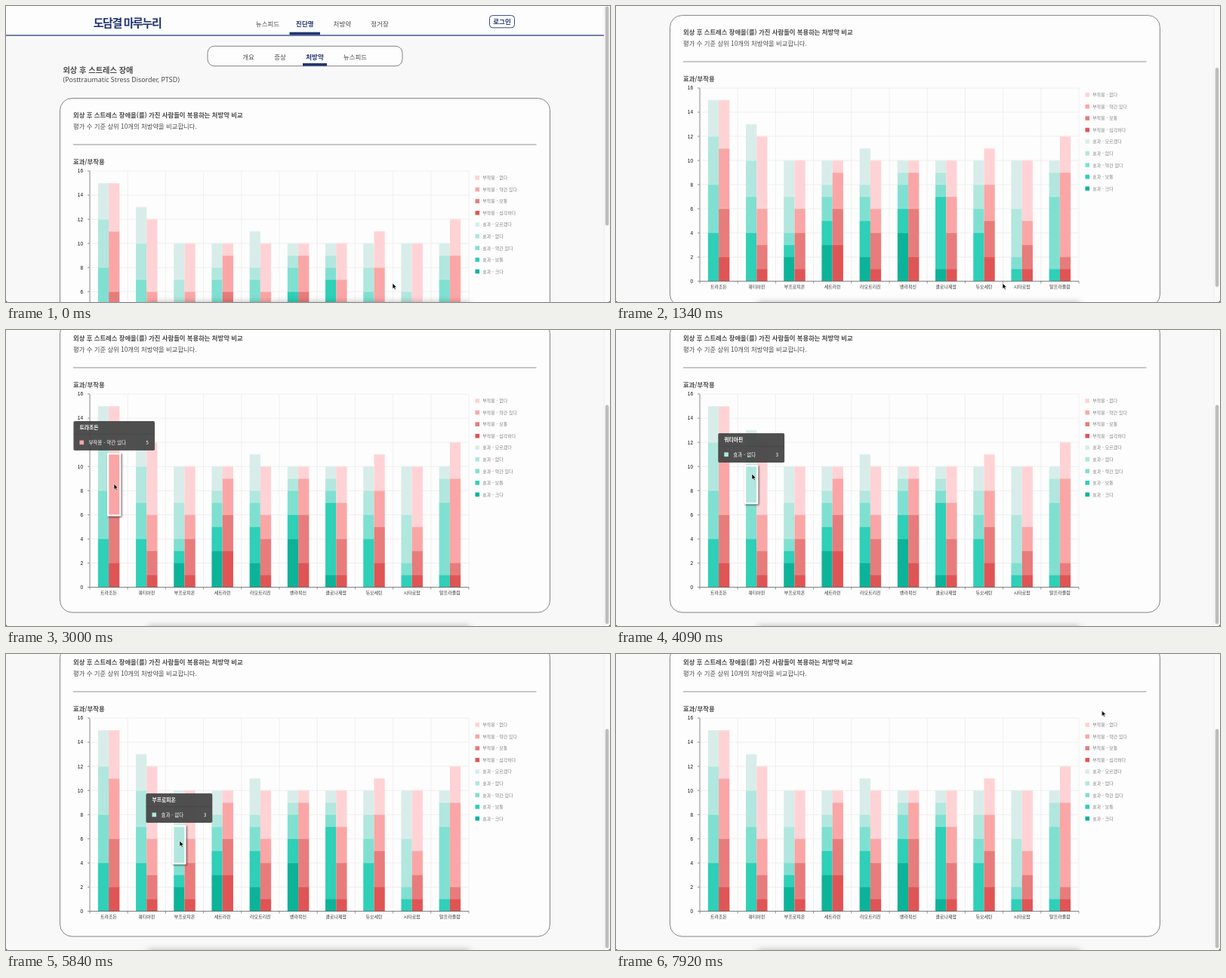
Write an HTML page that moves like this. It is 800 px wide and 393 px high and loops after 8000 ms.

```html
<!DOCTYPE html>
<html lang="ko">
<head>
<meta charset="utf-8">
<title>처방약 비교</title>
<style>
  html, body { margin: 0; width: 100%; height: 100%; overflow: hidden; background: #f8f8f8; }
  svg { display: block; width: 800px; height: 393px; }
  text { font-family: "Noto Sans CJK KR", "Noto Sans KR", "Noto Sans CJK", sans-serif; }
  .latin { font-family: "Noto Sans", sans-serif; }
  .axis { font-family: "Liberation Sans", Arial, sans-serif; }
  .picked { filter: drop-shadow(1px 1px 1px rgba(0, 0, 0, .65)); }
  .shade { filter: drop-shadow(0 0 4px rgba(0, 0, 0, .3)); }
</style>
</head>
<body>
<svg id="stage" viewBox="0 0 800 393"></svg>
<script>
const LOOP = 8000, SCROLL = 134;
const NAVY = '#22356f', INK = '#4c4c4c', EDGE = '#777', GRID = '#ececec';
const LEFT = 111, STEP = 50.2, BAR = 14.25, RIGHT = LEFT + 10 * STEP;
const BASE = 475.5, UNIT = 16.03, TOP = BASE - 16 * UNIT;

const stage = document.getElementById('stage');

function add(parent, tag, attrs = {}) {
  const el = document.createElementNS('http://www.w3.org/2000/svg', tag);
  for (const k in attrs) el.setAttribute(k, attrs[k]);
  parent.append(el);
  return el;
}

const box = (p, x, y, width, height, fill, more) =>
  add(p, 'rect', { x, y, width, height, fill, ...more });

const line = (p, x1, y1, x2, y2, stroke, w = .8) =>
  add(p, 'line', { x1, y1, x2, y2, stroke, 'stroke-width': w });

// y is the middle of the glyphs
function label(p, str, x, y, size, more) {
  const el = add(p, 'text', { x, y: y + size * .37, 'font-size': size, fill: INK, ...more });
  el.textContent = str;
  return el;
}

const MID = { 'text-anchor': 'middle' };
const END = { 'text-anchor': 'end' };
const BOLD = { 'font-weight': 700 };
const ACTIVE = { ...BOLD, fill: NAVY };
const FRAME = { stroke: EDGE, 'stroke-width': .9 };

function play(el, steps) {
  el.animate(steps.map(([t, props]) => ({ offset: t / LOOP, ...props })),
    { duration: LOOP, iterations: Infinity });
}

const at = (x, y) => ({ transform: `translate(${x}px, ${y}px)` });

// Both sides are listed from the bottom of the stack upwards
const sides = [
  { name: '효과', keys: ['크다', '보통', '약간 있다', '없다', '모르겠다'],
    colors: ['#0cb399', '#2fcfb8', '#7fe0d1', '#b1e7de', '#d8ede9'] },
  { name: '부작용', keys: ['심각하다', '보통', '약간 있다', '없다'],
    colors: ['#df5555', '#e87c7c', '#fba6a6', '#ffd3d5'] }
];

// Running totals of each stack
const drugs = [
  ['트라조든', [0, 4, 8, 12, 15], [2, 6, 11, 15]],
  ['쿼티아핀', [0, 4, 7, 10, 13], [1, 3, 6, 12]],
  ['부프로피온', [2, 3, 4, 7, 10], [1, 4, 6, 10]],
  ['세트라린', [3, 5, 7, 8, 10], [3, 6, 9, 10]],
  ['라모트리진', [2, 5, 7, 8, 11], [1, 4, 6, 10]],
  ['벤라팍신', [4, 6, 8, 9, 10], [2, 6, 9, 10]],
  ['클로나제팜', [1, 7, 8, 9, 10], [1, 4, 7, 10]],
  ['듀오세틴', [0, 4, 6, 8, 10], [2, 5, 8, 11]],
  ['시타로팜', [0, 1, 2, 6, 10], [1, 3, 5, 10]],
  ['알프라졸람', [0, 1, 7, 9, 10], [1, 2, 9, 12]]
];

// Every coloured block of the chart, measured in units above the base line
const blocks = drugs.flatMap(([drug, ...stacks], i) => stacks.flatMap((sums, s) => {
  const { name, keys, colors } = sides[s];
  return sums.map((top, k) => ({
    drug, top, value: top - (k ? sums[k - 1] : 0),
    x: LEFT + STEP * (i + .5) + BAR * (s - 1),
    text: `${name} - ${keys[k]}`, color: colors[k]
  }));
}));

// Pointer stops: time, x, y
const stops = [
  [0, 512, 368], [1780, 512, 368], [2080, 218.5, 364.5], [2300, 218.5, 364.5],
  [2700, 143, 205], [3500, 143, 203], [3800, 180, 191], [4250, 180, 191],
  [4900, 229.5, 206.5], [5400, 229.5, 206.5], [5650, 230, 248], [6000, 230, 248],
  [6500, 344, 262], [6750, 358.5, 249], [7000, 396, 225], [7640, 445, 232],
  [7880, 643.5, 75], [LOOP, 643.5, 75]
];

function pointerAt(t) {
  const i = stops.findIndex(s => s[0] > t);
  const [t0, x0, y0] = stops[i - 1], [t1, x1, y1] = stops[i];
  const k = (t - t0) / (t1 - t0);
  return [x0 + (x1 - x0) * k, y0 + (y1 - y0) * k];
}

// The last block touched stays picked until the pointer leaves the plot
function findHovers() {
  const runs = [];
  let run = null;
  for (let t = 2000; t < LOOP; t += 10) {
    const [x, y] = pointerAt(t);
    const v = (BASE - SCROLL - y) / UNIT;
    const hit = blocks.find(b => x >= b.x && x < b.x + BAR && v < b.top && v >= b.top - b.value);
    const left = x > RIGHT || v > 16;
    if (run && (left || hit && hit !== run.block)) {
      run.to = t;
      run = null;
    }
    if (hit && !run) runs.push(run = { block: hit, from: t });
  }
  return runs;
}

function drawTabs(p, names, active, centers, y) {
  names.forEach((s, i) => label(p, s, centers[i], y, 8.5, i === active ? { ...MID, ...ACTIVE } : MID));
}

function drawHeader(p) {
  box(p, 0, 0, 792, 38.3, '#fdfdfd');
  box(p, 0, 38.3, 792, 1.4, '#3a4c8c');
  label(p, '도담결 마루누리', 160.5, 22.5, 15,
    { ...MID, 'font-weight': 900, fill: NAVY, 'letter-spacing': -1.4 });
  drawTabs(p, ['뉴스피드', '진단명', '처방약', '정거장'], 1, [346.5, 395.8, 445.3, 495], 23.7);
  box(p, 375.5, 34.7, 40.5, 3.6, NAVY);
  box(p, 640.5, 12.6, 33, 16.2, '#fff', { rx: 4, stroke: NAVY, 'stroke-width': .9 });
  label(p, '로그인', 657, 20.6, 8.5, { ...MID, ...ACTIVE });

  box(p, 267, 53.3, 258, 26.4, '#fdfdfd', { rx: 9, ...FRAME });
  drawTabs(p, ['개요', '증상', '처방약', '뉴스피드'], 2, [321, 363, 409, 462.5], 68);
  box(p, 393, 76, 32, 3.6, NAVY);

  label(p, '외상 후 스트레스 장애', 75.5, 85.3, 10.2, BOLD);
  label(p, '(Posttraumatic Stress Disorder, PTSD)', 75.5, 98, 8.88, { class: 'latin' });
}

function drawCard(p) {
  box(p, 71.5, 122.5, 649, 386.5, '#fdfdfd', { rx: 16, ...FRAME });
  label(p, '외상 후 스트레스 장애을(를) 가진 사람들이 복용하는 처방약 비교', 89, 145, 8.36, BOLD);
  label(p, '평가 수 기준 상위 10개의 처방약을 비교합니다.', 89, 160, 8.35);
  line(p, 89, 184, 702.5, 184, EDGE);
  label(p, '효과/부작용', 89, 207, 8.35, BOLD);
}

function drawChart(p) {
  for (let v = 0; v <= 16; v += 2) {
    const y = BASE - v * UNIT;
    line(p, LEFT, y, RIGHT, y, GRID);
    line(p, LEFT - 3, y, LEFT, y, EDGE);
    label(p, v, 102, y, 6.5, { ...END, class: 'axis', fill: '#111' });
  }
  for (let i = 0; i <= 10; i++) {
    const x = LEFT + i * STEP;
    line(p, x, TOP, x, BASE, GRID);
    line(p, x, BASE, x, BASE + 3, EDGE);
  }

  const bars = add(p, 'g');
  for (const b of blocks) box(bars, b.x, -b.top * UNIT, BAR, b.value * UNIT, b.color);
  const grow = k => ({ transform: `translateY(${BASE}px) scaleY(${k})` });
  play(bars, [[0, grow(1)], [340, grow(1)], [340, grow(0)], [1340, grow(1)], [LOOP, grow(1)]]);

  line(p, LEFT, TOP, LEFT, BASE, EDGE);
  line(p, LEFT, BASE, RIGHT, BASE, '#666');
  drugs.forEach(([name], i) =>
    label(p, name, LEFT + STEP * (i + .5), 482.5, 6, { ...MID, fill: '#333' }));

  let y = 228;
  for (const { name, keys, colors } of [...sides].reverse()) {
    for (let k = keys.length - 1; k >= 0; k--, y += 15.56) {
      box(p, 621.5, y - 2.8, 5.6, 5.6, colors[k]);
      label(p, `${name} - ${keys[k]}`, 631.3, y, 6, { fill: '#808080' });
    }
  }
}

function show(el, { from, to }) {
  play(el, [[0, { opacity: 0 }], [from, { opacity: 0 }], [from, { opacity: 1 }],
    [to, { opacity: 1 }], [to, { opacity: 0 }], [LOOP, { opacity: 0 }]]);
}

function drawTip(p, { drug, text, color, value }) {
  const tip = add(p, 'g');
  const back = box(tip, 0, 0, 0, 39, '#464646', { rx: 1.8, 'fill-opacity': .95 });
  label(tip, drug, 8, 8.8, 6.8, { ...BOLD, fill: '#fff' });
  box(tip, 8, 25.5, 5.6, 5.6, color);
  const width = label(tip, text, 20, 28.3, 6.5, { fill: '#fff' }).getComputedTextLength() + 58;
  back.setAttribute('width', width);
  line(tip, 0, 17.5, width, 17.5, 'rgba(0,0,0,.12)');
  label(tip, value, width - 8, 28.3, 6.5, { ...END, fill: '#fff' });
  return { tip, width };
}

function drawHovers(p) {
  const marks = add(p, 'g'), tips = add(p, 'g');
  let last = null;
  for (const run of findHovers()) {
    const { block: b, from, to } = run;
    const y = BASE - b.top * UNIT;
    show(box(marks, b.x - 1, y - 1, BAR + 2, b.value * UNIT + 2, b.color,
      { stroke: '#fff', 'stroke-width': 2.2, class: 'picked' }), run);

    // The tooltip glides over from the block before
    const { tip, width } = drawTip(tips, b);
    const spot = { x: b.x + BAR / 2, y: y - 44.2 };
    const start = last || spot;
    const here = at(spot.x - width / 2, spot.y);
    const there = at(start.x - width / 2, start.y);
    play(tip, [[0, there], [from, { ...there, easing: 'ease' }],
      [Math.min(from + 200, to), here], [LOOP, here]]);
    show(tip, run);
    last = spot;
  }
}

function drawPointer(p) {
  const arrow = add(p, 'path', {
    d: 'M0 0V7.6L1.8 6L3 8.8L4.3 8.2L3.1 5.5H5.5Z',
    fill: '#000', stroke: '#fff', 'stroke-width': .6, 'stroke-linejoin': 'round'
  });
  play(arrow, stops.map(([t, x, y]) => [t, at(x, y)]));
}

function scroll(el, dy) {
  play(el, [[0, at(0, 0)], [255, { ...at(0, 0), easing: 'ease-in-out' }],
    [1790, at(0, dy)], [LOOP, at(0, dy)]]);
}

box(stage, 0, 0, 800, 393, '#f8f8f8');
const page = add(stage, 'g');
for (const draw of [drawHeader, drawCard, drawChart, drawHovers]) draw(page);
scroll(page, -SCROLL);

box(stage, 792, 0, 8, 393, '#fafafa');
line(stage, 792.3, 0, 792.3, 393, '#ebebeb');
scroll(box(stage, 793.8, .5, 4.6, 291, '#bdbdbd', { rx: 2.3 }), 99);

box(stage, 188, 393.5, 426, 10, '#000', { class: 'shade' });
add(stage, 'path', { d: 'M0 390.5Q0 393 2.5 393H0ZM800 390.5Q800 393 797.5 393H800Z', fill: '#222' });
drawPointer(stage);
</script>
</body>
</html>
```
